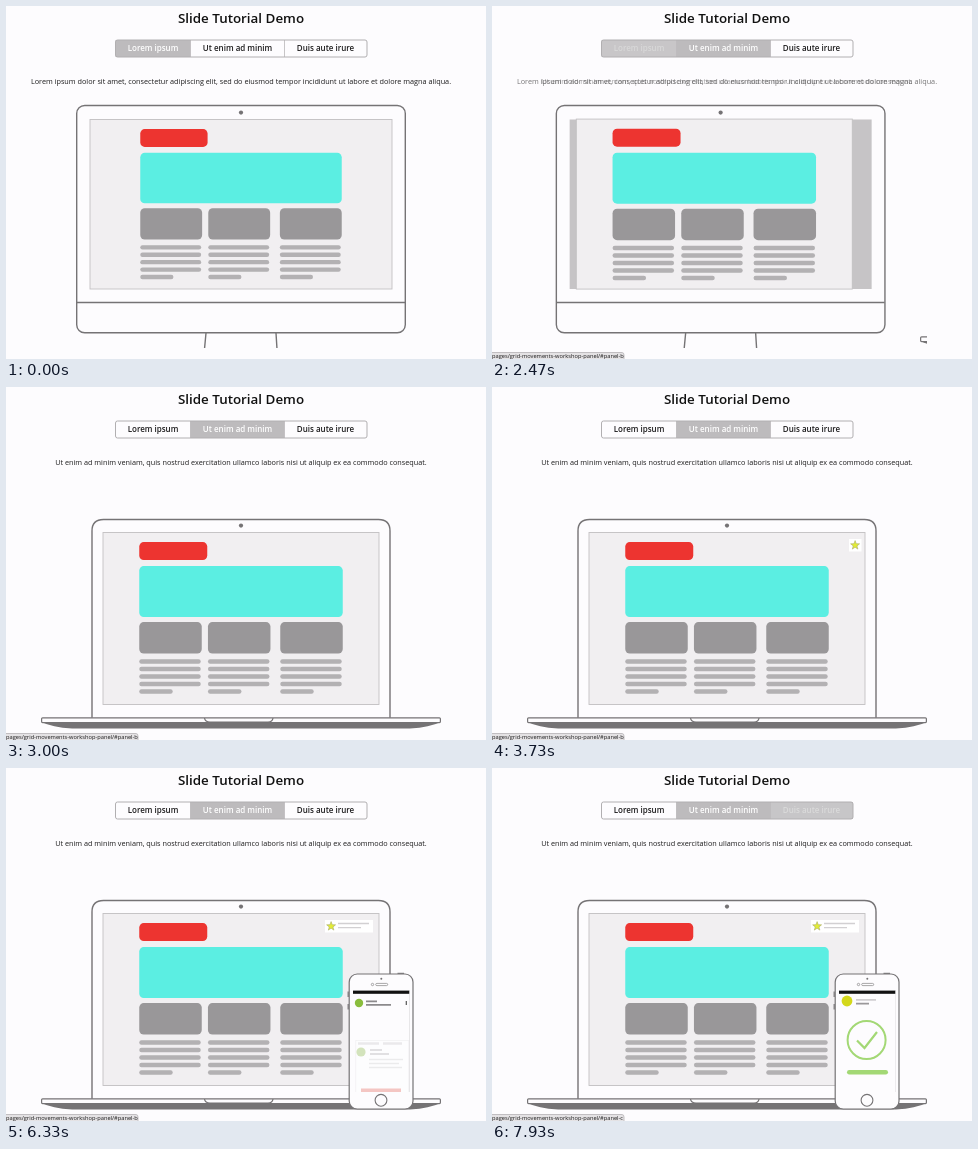
An HTML page for the animation above (8 s loop, 480x353 px).

```html
<!DOCTYPE html>
<html lang="en">
<head>
<meta charset="utf-8">
<title>Slide Tutorial Demo</title>
<style>
  html, body { margin: 0; width: 100%; height: 100%; overflow: hidden; background: #fdfcfe; }
  svg { display: block; width: 480px; height: 353px; }
  text { font-family: "Open Sans", "Noto Sans", sans-serif; fill: #1c1b1c; text-anchor: middle; }
  .title { font-size: 13.4px; font-weight: 600; fill: #111; }
  .tab text { font-size: 8px; font-weight: 600; }
  .copy { font-size: 7.27px; }
  .status { font-size: 5.7px; text-anchor: start; }
  .line { fill: none; stroke: #757375; stroke-width: 1.4; }
  .body { fill: #fdfcfe; stroke: #757375; stroke-width: 1.4; }
  .dark { fill: #757375; }
  .screen { fill: #c6c4c6; }
</style>
</head>
<body>
<svg viewBox="0 0 480 353" width="480" height="353">
  <defs>
    <clipPath id="view"><rect x="35" y="90" width="400" height="252"/></clipPath>
    <clipPath id="glass"><rect x="347" y="222" width="56.5" height="102"/></clipPath>
  </defs>
  <rect width="480" height="353" fill="#fdfcfe"/>
  <text class="title" x="235" y="17">Slide Tutorial Demo</text>

  <g class="tab"><rect x="109.5" y="34" width="75" height="17"/><text x="147" y="45">Lorem ipsum</text></g>
  <g class="tab"><rect x="184.5" y="34" width="94" height="17"/><text x="231.5" y="45">Ut enim ad minim</text></g>
  <g class="tab"><rect x="278.5" y="34" width="82.5" height="17"/><text x="319.5" y="45">Duis aute irure</text></g>
  <path d="M184.5 34V51M278.5 34V51" stroke="#b9b7b9" stroke-width=".8"/>
  <rect x="109.5" y="34" width="251.5" height="17" rx="2" fill="none" stroke="#b1afb1"/>

  <text class="copy" id="copyA" x="235" y="78">Lorem ipsum dolor sit amet, consectetur adipiscing elit, sed do eiusmod tempor incididunt ut labore et dolore magna aliqua.</text>
  <text class="copy" id="copyB" x="235" y="78">Ut enim ad minim veniam, quis nostrud exercitation ullamco laboris nisi ut aliquip ex ea commodo consequat.</text>

  <g clip-path="url(#view)">
    <g id="monitor">
      <path class="line" d="M200 327L198.5 343M270 327L271 343"/>
      <rect class="body" x="70.7" y="99.5" width="328.6" height="227.3" rx="8"/>
      <path class="line" d="M71 296.5H399"/>
      <circle class="dark" cx="235" cy="106.6" r="2.1"/>
      <rect class="screen" x="84" y="113.5" width="302" height="169.5"/>
    </g>
    <g id="laptop">
      <path class="body" d="M86 331V144Q86 132.5 97.5 132.5H372.5Q384 132.5 384 144V331"/>
      <circle class="dark" cx="235" cy="138.6" r="2.1"/>
      <rect class="screen" x="97" y="145.5" width="276" height="172"/>
      <path class="dark" d="M35.5 335H434.5Q424 340.5 404 341.4H66Q46 340.5 35.5 335Z"/>
      <rect class="body" x="35.6" y="330.8" width="398.8" height="4.8" rx="1" style="stroke-width:1.2"/>
      <path class="line" d="M198.5 331Q199 335 204 335H262Q266.5 335 267 331" style="stroke-width:1.2"/>
    </g>
    <rect id="page" fill="#f1eff1" stroke="#c3c1c3" stroke-width=".9"/>
    <g id="content"></g>

    <g id="badge">
      <rect id="badgeBox" y="152" height="12.5" fill="#fff"/>
      <path id="star" fill="#e2ec35" stroke="#a9ab6a" stroke-width=".6"/>
      <path id="badgeText" d="M332 155.5H363M332 159.7H355" stroke="#d2d0d2" stroke-width="1.3"/>
    </g>

    <g id="phone">
      <path d="M342.2 223.5V229M342.2 236V241.5M391.5 205.4H398" stroke="#858385" stroke-width="1.4"/>
      <rect class="body" x="343.2" y="206" width="63.8" height="135" rx="8" style="stroke-width:1.2"/>
      <circle class="dark" cx="375.3" cy="210.8" r="1"/>
      <circle cx="366.5" cy="216.5" r="1.2" fill="none" stroke="#858385" stroke-width=".7"/>
      <rect x="369.7" y="215.4" width="12" height="2.2" rx="1.1" fill="none" stroke="#858385" stroke-width=".7"/>
      <circle class="line" cx="375" cy="332.3" r="5.9" style="stroke-width:1.1"/>
      <rect class="screen" x="347" y="222" width="56.5" height="102"/>
      <g clip-path="url(#glass)">
        <g id="app">
          <rect x="347" y="222" width="56.5" height="102" fill="#fdfcfe"/>
          <circle cx="353" cy="235" r="4.2" fill="#8abd3d"/>
          <path d="M360 233.3H371M360 236.8H385" stroke="#8c8a8c" stroke-width="1.7"/>
          <path d="M400.3 233V237" stroke="#555" stroke-width="1.2"/>
          <g id="card">
            <rect x="349.8" y="245.5" width="53" height="78" fill="#fff" stroke="#dddbdd" stroke-width=".8"/>
            <path d="M352 248.5H373M377 248.5H396" stroke="#c5c3c5" stroke-width="2.4"/>
            <circle cx="355" cy="257" r="4.6" fill="#7fb034"/>
            <path d="M364 255H376M364 259H383" stroke="#8c8a8c" stroke-width="1.6"/>
            <path d="M363 264.5H397M363 268.5H393M363 272.5H396" stroke="#c9c7c9" stroke-width="1.3"/>
            <rect x="355" y="293.5" width="40" height="7" fill="#e4574a"/>
            <rect x="355" y="304" width="40" height="7" fill="#c08a50"/>
          </g>
        </g>
        <g id="done">
          <rect id="sheet" x="347" y="226" width="56.5" height="130" fill="#fdfcfe"/>
          <circle cx="355" cy="233" r="5.4" fill="#d4d81b"/>
          <path d="M364 231.8H384" stroke="#d0ced0" stroke-width="1.7"/>
          <path d="M364 235.6H377" stroke="#9a989a" stroke-width="1.7"/>
          <circle cx="374.6" cy="272" r="19" fill="none" stroke="#a3d875" stroke-width="2"/>
          <path d="M365 272.5L372.5 280L385 264" fill="none" stroke="#a3d875" stroke-width="2.2"/>
          <rect x="355" y="302" width="41" height="4.4" rx="2.2" fill="#a3d875"/>
        </g>
        <rect id="topBar" x="347" y="222.6" width="56.5" height="3.2" fill="#111"/>
      </g>
    </g>
  </g>

  <g id="status">
    <path d="M-1 346.5H130Q132 346.5 132 349V354H-1Z" fill="#e4e2e4" stroke="#b5b3b5" stroke-width=".8"/>
    <text class="status" id="link" x="0" y="352"></text>
  </g>
</svg>
<script>
const $ = id => document.getElementById(id);
const LOOP = 8000;
const tabs = [...document.querySelectorAll('.tab')];

const set = (el, attrs) => { for (const k in attrs) el.setAttribute(k, attrs[k]); };
const clamp = v => Math.max(0, Math.min(1, v));
const lerp = (a, b, p) => a + (b - a) * p;
const ramp = (t, start, span) => clamp((t - start) / span);
const mix = (a, b, p) => `rgb(${a.map((v, i) => Math.round(lerp(v, b[i], p)))})`;

// cubic-bezier(.25, .1, .25, 1)
function ease(x) {
  if (x <= 0 || x >= 1) return clamp(x);
  let lo = 0, hi = 1, s = .5;
  for (let i = 0; i < 24; i++) {
    s = (lo + hi) / 2;
    const bx = .75 * s * (1 - s) ** 2 + .75 * (1 - s) * s * s + s ** 3;
    if (bx < x) lo = s; else hi = s;
  }
  return .3 * s * (1 - s) ** 2 + 3 * (1 - s) * s * s + s ** 3;
}
const glide = (t, start, span) => ease(ramp(t, start, span));

function buildContent() {
  const box = (x, y, w, h, r, fill) =>
    `<rect x="${x}" y="${y}" width="${w}" height="${h}" rx="${r}" fill="${fill}"/>`;
  let out = box(0, 0, 68, 18, 4.5, '#ed3430') + box(0, 24, 203.5, 51, 4.5, '#5beee2');
  for (const x of [0, 68.7, 141]) {
    out += box(x, 80, 62.5, 31.5, 4.5, '#999799');
    for (let i = 0; i < 5; i++)
      out += box(x, 117.2 + i * 7.5, i < 4 ? 61.5 : 33.5, 4.4, 2.2, '#b3b1b3');
  }
  $('content').innerHTML = out;
}

function starPath(cx, cy, r) {
  const pts = [];
  for (let i = 0; i < 10; i++) {
    const a = i * Math.PI / 5, d = i % 2 ? r * .42 : r;
    pts.push((cx + d * Math.sin(a)).toFixed(2) + ' ' + (cy - d * Math.cos(a)).toFixed(2));
  }
  return 'M' + pts.join('L') + 'Z';
}

function drawTabs(t) {
  const levels = [1 - ramp(t, 2420, 300), ramp(t, 2070, 260), ramp(t, 7680, 300)];
  tabs.forEach((tab, i) => {
    const [bg, label] = tab.children;
    bg.style.fill = mix([253, 252, 254], [189, 187, 189], levels[i]);
    label.style.fill = mix([28, 27, 28], [255, 255, 255], levels[i]);
  });
  const swap = ramp(t, 2400, 180);
  set($('copyA'), { opacity: 1 - swap });
  set($('copyB'), { opacity: swap });
  set($('status'), { opacity: t < 2070 ? 0 : 1 });
  $('link').textContent = 'pages/grid-movements-workshop-panel/#panel-' + (t < 7680 ? 'b' : 'c');
}

function drawSlides(t) {
  const START = 2455;
  set($('monitor'), { transform: `translate(${-400 * glide(t, START, 550)} 0)` });
  set($('laptop'), { transform: `translate(${400 - 400 * glide(t, START, 512)} 0)` });

  // the shared page travels from one screen to the other, shrinking a little on its way
  const wide = t < START;
  const q = glide(t, START, 415);
  const dip = Math.sin(Math.PI * ramp(t, 2470, 520));
  const x = 84 + 13 * q;
  const y = wide ? 113.5 : 112.3 + 33.2 * q;
  const w = wide ? 302 : 276 - dip;
  const h = wide ? 169.5 : lerp(170, 172, q) - 5 * dip;
  const s = wide ? .99 : 1 - .025 * dip;
  set($('page'), { x, y, width: w, height: h, 'stroke-opacity': 1 - dip });
  const cx = x + (w - 203.5 * s) / 2;
  set($('content'), { transform: `translate(${cx} ${y + 9.6}) scale(${s})` });
}

function drawBadge(t) {
  const pop = glide(t, 3350, 300), open = glide(t, 3760, 370);
  const left = lerp(357, 319, open), right = lerp(369.5, 367, open);
  set($('badgeBox'), { x: left, width: right - left });
  set($('star'), { d: starPath(left + 6.1, 158.3, 4.7) });
  set($('badgeText'), { opacity: ramp(open, .6, .4) });
  set($('badge'), {
    opacity: pop > 0 ? 1 : 0,
    transform: `translate(363 158) scale(${pop}) translate(-363 -158)`
  });
}

function drawPhone(t) {
  const rise = glide(t, 4250, 480);
  const buzz = t > 4870 && t < 5670 ? -Math.sin((t - 4870) / 140 * 2 * Math.PI) : 0;
  set($('phone'), {
    opacity: rise > 0 ? 1 : 0,
    transform: `translate(${buzz} ${140 * (1 - rise)})`
  });
  const on = ramp(t, 5470, 260);
  set($('app'), { opacity: on });
  set($('topBar'), { opacity: on });

  const card = glide(t, 6250, 380);
  set($('card'), { opacity: card, transform: `translate(0 ${40 * (1 - card)})` });

  const q = glide(t, 6800, 575);
  set($('done'), { opacity: q > 0 ? 1 : 0, transform: `translate(0 ${100 * (1 - q)})` });
  set($('sheet'), { opacity: q });
}

function draw(t) {
  drawTabs(t);
  drawSlides(t);
  drawBadge(t);
  drawPhone(t);
}

buildContent();
draw(0);
const origin = performance.now();
(function tick() {
  draw((performance.now() - origin) % LOOP);
  requestAnimationFrame(tick);
})();
</script>
</body>
</html>
```
